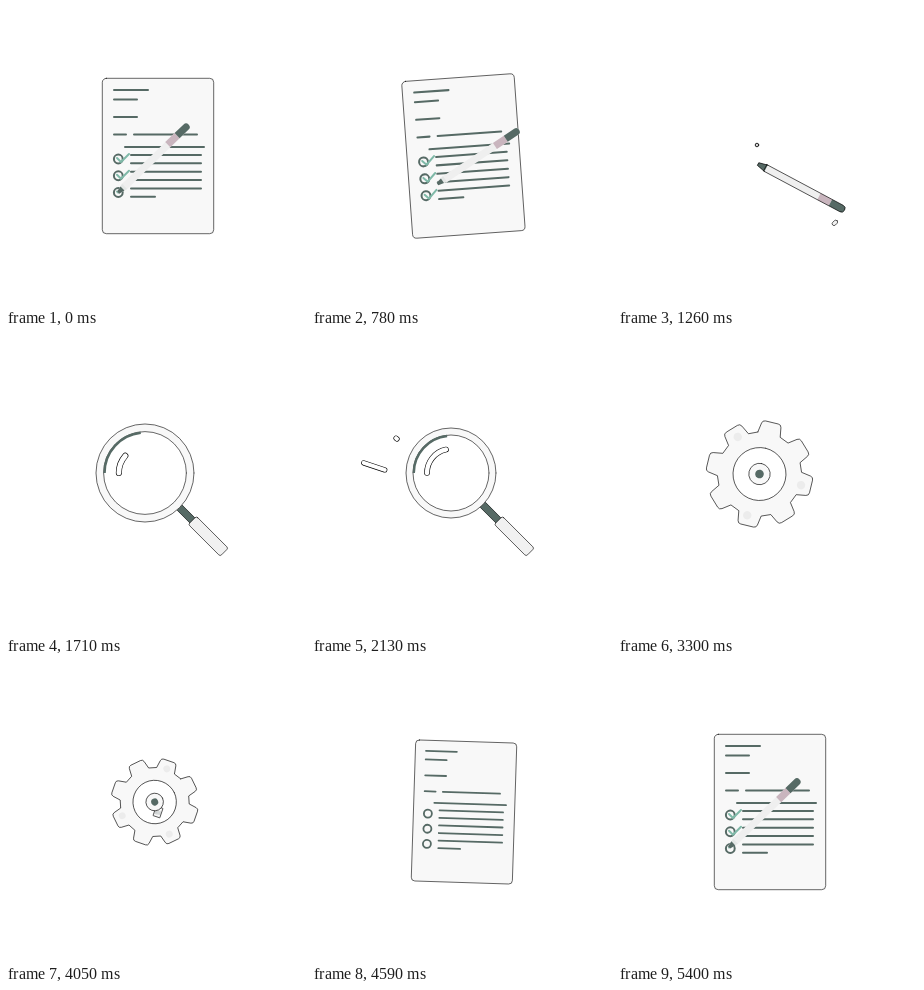
An HTML page with a canvas that plays this animation: 300x300 px, repeating every 5.43 s.

```html
<!DOCTYPE html>
<html lang="en">
<head>
<meta charset="utf-8">
<title>Document, magnifier and gear</title>
<style>
html, body { margin: 0; width: 100%; height: 100%; overflow: hidden; background: #fff; }
canvas { display: block; width: 300px; height: 300px; }
</style>
</head>
<body>
<canvas id="stage" width="300" height="300"></canvas>
<script>
const ctx = document.getElementById('stage').getContext('2d');
const LOOP = 5430, EDGE = 0.6;
const DARK = '#566a65', PAPER = '#f8f8f8', MINT = '#7fb9a8', MAUVE = '#c9b5be', INK = '#000';
const RAD = Math.PI / 180;

const ramp = (t, a, b) => Math.min(1, Math.max(0, (t - a) / (b - a)));
const smooth = k => k * k * (3 - 2 * k);
const backOut = k => 1 + 2.7 * (k - 1) ** 3 + 1.7 * (k - 1) ** 2;
const mix = (a, b, k) => a + (b - a) * k;
const mixPoint = (p, q, k) => p.map((v, i) => mix(v, q[i], k));

function placed(x, y, angle, scale, draw) {
  if (scale <= 0.001) return;
  ctx.save();
  ctx.translate(x, y);
  ctx.rotate(angle * RAD);
  ctx.scale(scale, scale);
  draw(EDGE / scale);
  ctx.restore();
}

function stroke(path, color, width, cap = 'round') {
  ctx.strokeStyle = color;
  ctx.lineWidth = width;
  ctx.lineCap = cap;
  ctx.stroke(path);
}

function shape(path, fill, edge) {
  ctx.fillStyle = fill;
  ctx.fill(path, 'evenodd');
  if (edge) stroke(path, INK, edge);
}

function pill(path, width, edge) {
  stroke(path, INK, width + edge);
  stroke(path, '#fff', width - edge);
}

function line(...points) {
  const p = new Path2D();
  points.forEach(([x, y]) => p.lineTo(x, y));
  return p;
}

function circle(x, y, r, from = 0, to = 360) {
  const p = new Path2D();
  p.arc(x, y, r, from * RAD, to * RAD);
  return p;
}

function ring(outer, inner) {
  const p = circle(0, 0, outer);
  p.addPath(circle(0, 0, inner));
  return p;
}

function box(x, y, w, h, r = 0) {
  const p = new Path2D();
  p.roundRect(x, y, w, h, r);
  return p;
}

// Checklist: a tick is a V with both arms at 45 degrees.
const rowY = i => 153 + 16.75 * i;
const tickPoint = (i, k) => {
  const x = 111 + 12 * k;
  return [x, rowY(i) + 3 - Math.abs(x - 115)];
};
const DRAWING = 0.7; // share of each row's turn spent on its tick
const rowsWritten = s => 2.7 * (1 - (1 - ramp(s, 4700, 5880)) ** 1.5);

function tick(i, k) {
  if (k <= 0) return;
  const turn = Math.min(k, 1 / 3);
  stroke(line(tickPoint(i, 0), tickPoint(i, turn), tickPoint(i, k)), MINT, 2);
}

function rule(y, from, to) {
  stroke(line([from, y], [to, y]), DARK, 2);
}

function paper(s) {
  const arrive = ramp(s, 4010, 4650), leave = ramp(s, 6060, 6690);
  const sway = smooth(Math.min(1, leave * 1.5));
  const angle = 20 * (1 - arrive) - 14 * sway;
  const scale = arrive * (1 + 0.04 * sway) * (1 - leave ** 14);
  placed(152 - 2 * sway, 150, angle, scale, edge => {
    ctx.translate(-152, -150);
    shape(box(96.3, 72.3, 111.4, 155.4, 4), PAPER, edge);
    rule(84, 108, 142);
    rule(93.5, 108, 131);
    rule(111, 108, 131);
    rule(128.5, 108, 120);
    rule(128.5, 128, 191);
    rule(141, 119, 198);
    for (let i = 0; i < 6; i++) rule(149 + 8.35 * i, 125, i < 5 ? 195 : 149);
    for (let i = 0; i < 3; i++) {
      stroke(circle(112.3, rowY(i), 4.4), DARK, 2);
      tick(i, ramp(rowsWritten(s), i, i + DRAWING));
    }
  });
}

function penTip(s) {
  const u = rowsWritten(s), i = Math.floor(u), part = u - i;
  const written = tickPoint(i, Math.min(1, part / DRAWING));
  return mixPoint(written, tickPoint(i + 1, 0), ramp(part, DRAWING + 0.001, 1));
}

function pen(s) {
  const swing = smooth(ramp(s, 6060, 6690)), fade = ramp(s, 6690, 6990);
  const [x, y] = mixPoint(penTip(s), [140, 158], swing);
  const scale = ramp(s, 4650, 4780) * (1 - fade ** 2);
  const loose = s > 6600;
  placed(x + 30 * fade, y + 12 * fade, -44 + 72 * swing + 17 * fade, scale, edge => {
    const h = 3.6;
    const barrel = box(8, -h, 90, 2 * h, [0, 3.5, 3.5, 0]);
    const cone = line([9, -h], [0, -1.5], [0, 1.5], [9, h]);
    shape(barrel, '#efefef');
    shape(cone, loose ? DARK : '#e4e7e6');
    shape(line([6, -2.8], [0, -1.5], [0, 1.5], [6, 2.8]), DARK);
    shape(box(69, -h, 13, 2 * h), MAUVE);
    shape(box(82, -h, 16, 2 * h, [0, 3.5, 3.5, 0]), DARK);
    if (loose) {
      stroke(cone, INK, edge);
      stroke(barrel, INK, edge);
    }
  });
}

// A dash that shoots out of the lens: its tail follows its head.
function dash(t, start, from, to) {
  const head = smooth(ramp(t, start, start + 420));
  const tail = smooth(ramp(t, start + 230, start + 650));
  if (head > 0 && tail < 1) pill(line(mixPoint(from, to, tail), mixPoint(from, to, head)), 4.6, EDGE);
}

function magnifier(t) {
  const lens = t < 1255 ? 0 : backOut(ramp(t, 1255, 1940)) * (1 - smooth(ramp(t, 2860, 3080)));
  const grip = ramp(t, 1230, 1600) * (1 - smooth(ramp(t, 2880, 3120)));
  dash(t, 1880, [73, 136], [40, 125]);
  dash(t, 2080, [85, 105], [62, 85]);
  placed(139, 139, 45, grip > 0 ? 1 : 0, edge => {
    const end = 112, length = 45 * grip, width = 11.4 * grip ** 0.25;
    const from = 45 * lens + 1, to = end - length;
    if (grip > 0.5 && from < to) {
      const neck = line([from, 0], [to, 0]);
      stroke(neck, INK, 7 + edge);
      stroke(neck, DARK, 7);
    }
    shape(box(end - length, -width / 2, length, width, 2), '#f1f1f1', edge);
  });
  placed(139, 139, 0, lens, edge => {
    shape(ring(45, 38), PAPER, edge);
    stroke(circle(0, 0, 37.2, 180, 264), DARK, 2.4, 'butt');
    const shine = ramp(t, 1500, 1900);
    if (shine > 0) pill(circle(0, 0, 24, 180, 180 + 78 * shine), 5, edge);
  });
}

function gearPath() {
  const p = new Path2D();
  for (let i = 0; i < 8; i++) {
    const c = Math.cos(i * 45 * RAD), s = Math.sin(i * 45 * RAD);
    const at = (x, y) => [x * c - y * s, x * s + y * c];
    p.lineTo(...at(40.5, -11.5));
    p.arcTo(...at(53, -9.5), ...at(53, 0), 3.5);
    p.arcTo(...at(53, 9.5), ...at(40.5, 11.5), 3.5);
    p.lineTo(...at(40.5, 11.5));
  }
  p.closePath();
  p.addPath(circle(0, 0, 26.5));
  return p;
}
const GEAR = gearPath();

function gear(t) {
  const scale = smooth(ramp(t, 2980, 3240)) * (1 - ramp(t, 3990, 4330));
  const x = 141.5 + 7.2 * smooth(ramp(t, 3400, 3960));
  const turn = -76.5 + (t - 3300) * 50.5 / 750;
  placed(x, 140, turn, scale, edge => {
    shape(GEAR, PAPER, edge);
    for (const a of [-44, 91.5, 183]) {
      shape(circle(43 * Math.cos(a * RAD), 43 * Math.sin(a * RAD), 4.2), '#ececec');
    }
    shape(circle(0, 0, 10.7), PAPER, edge);
    shape(circle(0, 0, 4.3), DARK);
  });
}

function frame(now) {
  const t = now % LOOP;
  const s = t < 2000 ? t + LOOP : t; // the document's scene runs across the loop point
  ctx.fillStyle = '#fff';
  ctx.fillRect(0, 0, 300, 300);
  ctx.lineJoin = 'round';
  paper(s);
  magnifier(t);
  gear(t);
  pen(s);
}

const began = performance.now();
function loop() {
  frame(performance.now() - began);
  requestAnimationFrame(loop);
}
loop();
</script>
</body>
</html>
```
